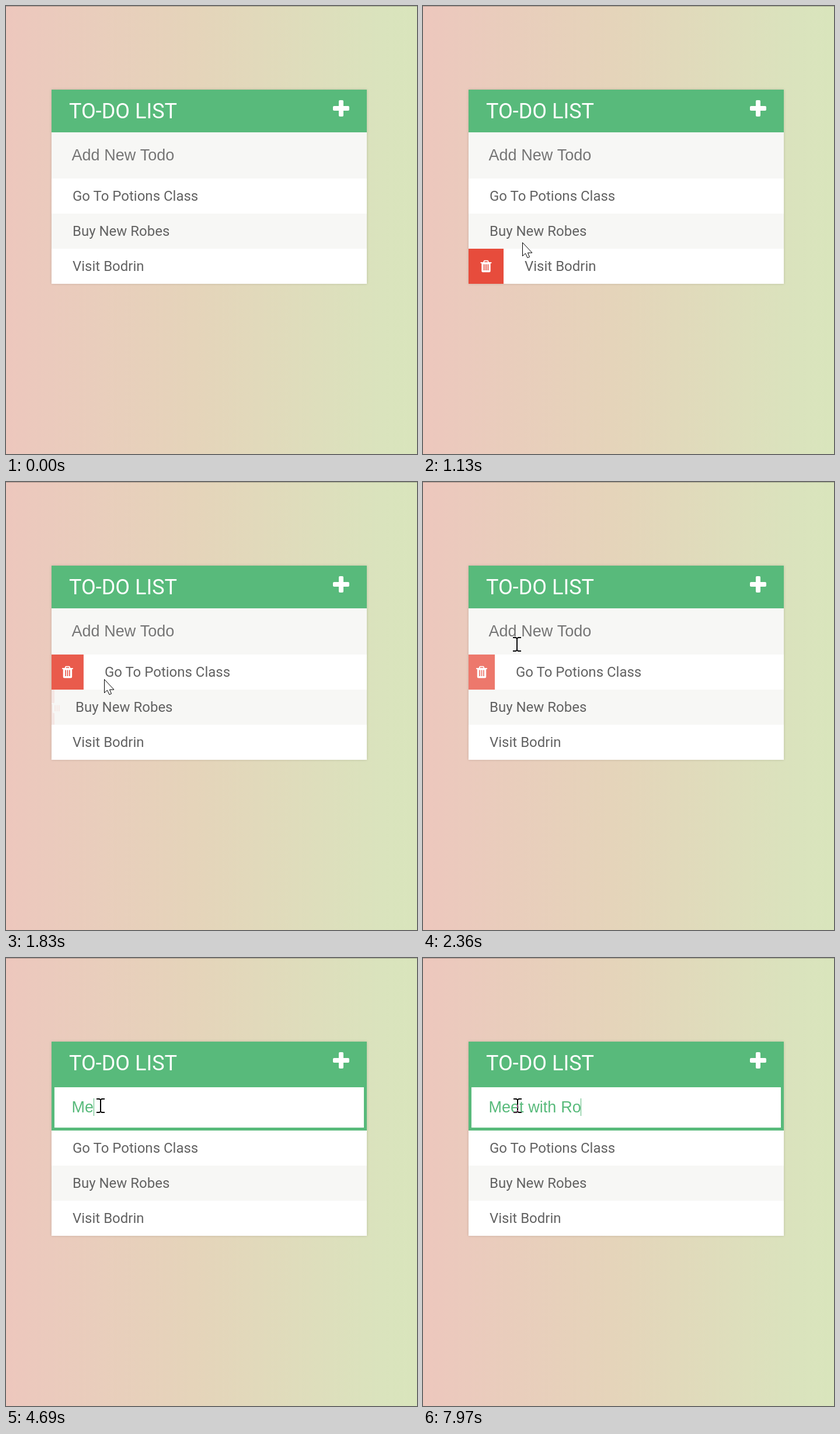
An HTML page for the animation above (8 s loop, 704 by 766 pixels).

```html
<!DOCTYPE html>
<html lang="en">
<head>
<meta charset="utf-8">
<title>To-do list</title>
<style>
  html, body { margin: 0; width: 100%; height: 100%; overflow: hidden; }
  svg { display: block; width: 704px; height: 766px; }
  text { white-space: pre; }
  .title { font: 36px Roboto, sans-serif; fill: #fff; }
  .field { font: 27px "Liberation Sans", Arial, sans-serif; word-spacing: .3px; fill: #757575; }
  .field.typed { fill: #58ba7b; }
  .item { font: 24px Roboto, sans-serif; fill: #626262; }
  #card { filter: drop-shadow(0 0 2px rgba(0, 0, 0, .15)); }
  #beam { mix-blend-mode: difference; }
</style>
</head>
<body>
<svg viewBox="0 0 704 766">
  <defs>
    <linearGradient id="sky">
      <stop offset="0" stop-color="#edc7bd"/>
      <stop offset=".1" stop-color="#ebcabd"/>
      <stop offset=".46" stop-color="#e5d4ba"/>
      <stop offset=".91" stop-color="#dae3bd"/>
      <stop offset="1" stop-color="#d9e5bc"/>
    </linearGradient>
    <g id="trash" fill="#fff">
      <path d="M-4.2-6.5L-3-9.4H3L4.2-6.5" fill="none" stroke="#fff" stroke-width="1.8" stroke-linejoin="round"/>
      <rect x="-9.4" y="-6.9" width="18.8" height="1.8" rx=".4"/>
      <path d="M-7.7-5.2V8Q-7.7 10.3-5.6 10.3H5.6Q7.7 10.3 7.7 8V-5.2Z"/>
      <path d="M-3.4-3.4V6.9M0-3.4V6.9M3.4-3.4V6.9" stroke="#e74c3c" stroke-width="1.7"/>
    </g>
  </defs>

  <rect width="704" height="766" fill="url(#sky)"/>
  <rect width="704" height="1" opacity=".25"/>
  <rect id="card" x="78" y="143" width="540" height="332" fill="#fff"/>

  <rect x="78" y="143" width="540" height="73" fill="#58ba7b"/>
  <text class="title" x="108" y="192">TO-DO LIST</text>
  <g fill="#fff">
    <rect x="560" y="171" width="28" height="8" rx="2"/>
    <rect x="570" y="161" width="8" height="28" rx="2"/>
  </g>

  <rect id="frame" x="78" y="216" width="540" height="79"/>
  <rect id="inner" x="83" y="221" width="530" height="69" fill="#fff"/>
  <text id="field" class="field" x="112.5" y="264"></text>
  <rect id="caret" width="1" height="30" fill="#58ba7b"/>

  <g id="rows"></g>

  <path id="arrow" d="M.5.5V23.5L5.5 19 9 26.5 12.5 25 9.5 18H17Z" fill="#fff" stroke="#000" stroke-linejoin="round"/>
  <path id="beam" d="M-7-11.5H-2L0-10 2-11.5H7M0-10V10M-7 11.5H-2L0 10 2 11.5H7" fill="none" stroke="#fff" stroke-width="2"/>
</svg>

<script>
const LOOP = 8000, FOCUS = 2900, BLINK = 550;
const FADE = 200, OPEN = 60, STEP = 77, TEXT_X = 112.5;
const $ = id => document.getElementById(id);
const clamp = v => Math.max(0, Math.min(1, v));
const set = (el, attrs) => {
  for (const name in attrs) el.setAttribute(name, attrs[name]);
};
const show = (el, on) => set(el, { visibility: on ? "visible" : "hidden" });

const labels = ["Go To Potions Class", "Buy New Robes", "Visit Bodrin"];
// The pointer climbs the list: each crossing opens one row and closes the one below
const crossings = [885, 1130, 1640, 2312];

const moves = [
  { from: 360, to: 1130, x: 170, y: 404 },
  { from: 1130, to: 1900, x: 168, y: 332 },
  { from: 2131, to: 2520, x: 160, y: 249.5 },
  { from: 3000, to: 3055, x: 151, y: 244.5 },
  { from: 3055, to: 3286, x: 162, y: 252.5 }
];

const words = [
  { text: "Meet ", from: 4230, to: 5560 },
  { text: "with ", from: 6180, to: 7040 },
  { text: "Ro", from: 7670, to: 7970 }
];
const keys = words.flatMap(({ text, from, to }) =>
  [...text].map((char, i) => ({ char, time: from + (to - from) * i / (text.length - 1) })));

$("rows").innerHTML = labels.map((label, i) => `
  <g transform="translate(78 ${295 + 60 * i})">
    <rect width="540" height="60" fill="${i % 2 ? "#f7f7f5" : "#fff"}"/>
    <g class="button"><rect class="red" height="60" fill="#e74c3c"/><use href="#trash" y="30"/></g>
    <text class="item" y="38">${label}</text>
  </g>`).join("");

const rows = [...$("rows").children].map((row, i) => ({
  button: row.querySelector(".button"),
  red: row.querySelector(".red"),
  icon: row.querySelector("use"),
  text: row.querySelector("text"),
  enter: crossings[2 - i],
  leave: crossings[3 - i]
}));

// Pointer and hover motion advance in steady, coarse steps
const snap = t => 360 + STEP * Math.floor((t - 351) / STEP);

function pointerAt(t) {
  let x = 448, y = 695;
  for (const move of moves) {
    const rest = 1 - clamp((t - move.from) / (move.to - move.from));
    x = move.x + (x - move.x) * rest ** 2.1;
    y = move.y + (y - move.y) * rest ** 1.2;
  }
  return { x, y };
}

function drawRow(row, t) {
  const p = clamp((t - row.enter) / FADE) - clamp((t - row.leave) / FADE);
  const width = OPEN * p;
  set(row.button, { opacity: p });
  set(row.red, { width });
  set(row.icon, { x: Math.max(9.5, width / 2) });
  set(row.text, { x: 36 + width });
}

function drawField(t) {
  const focused = t >= FOCUS;
  const pressed = keys.filter(key => key.time <= t);
  const typing = pressed.length > 0;
  const field = $("field"), caret = $("caret");
  set($("frame"), { fill: focused ? "#58ba7b" : "#f7f7f5" });
  show($("inner"), focused);

  field.textContent = typing ? pressed.map(key => key.char).join("") : "Add New Todo";
  field.classList.toggle("typed", typing);

  const end = typing ? TEXT_X + field.getComputedTextLength() : TEXT_X;
  set(caret, { x: Math.max(113, Math.floor(end)), y: typing ? 240 : 241 });
  const since = t - (typing ? pressed[pressed.length - 1].time : FOCUS);
  show(caret, focused && since % (2 * BLINK) < BLINK);
}

function drawPointer(t, now) {
  const { x, y } = pointerAt(now);
  const inField = y < 295;
  set($("arrow"), { transform: `translate(${Math.round(x)} ${Math.round(y)})` });
  set($("beam"), { transform: `translate(${Math.round(x)} ${Math.floor(y) + .5})` });
  show($("arrow"), t >= 360 && !inField);
  show($("beam"), inField);
}

function draw(t) {
  const now = snap(t);
  rows.forEach(row => drawRow(row, now));
  drawField(t);
  drawPointer(t, now);
}

const start = performance.now();
function tick() {
  draw((performance.now() - start) % LOOP);
  requestAnimationFrame(tick);
}
tick();
</script>
</body>
</html>
```
